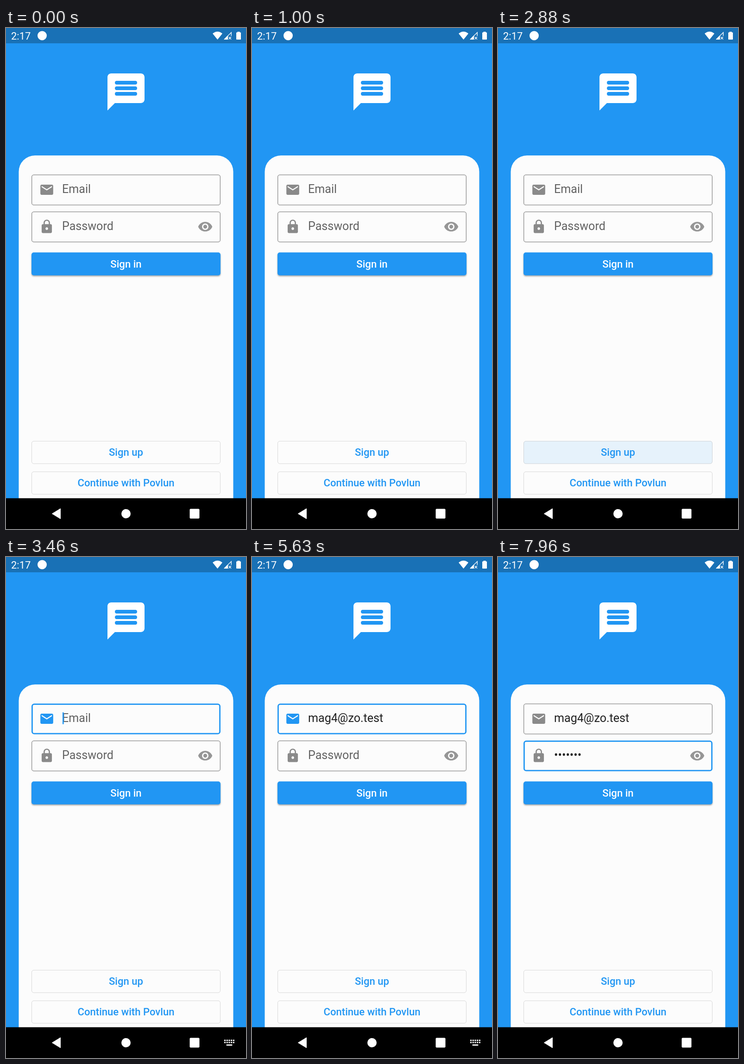
Animation of 518x1081 px, one loop 8000 ms. Source, as an HTML page:

```html
<!DOCTYPE html>
<html lang="en">
<head>
<meta charset="utf-8">
<title>Sign in screen</title>
<style>
html, body { margin: 0; width: 100%; height: 100%; overflow: hidden; background: #000; }
svg { display: block; width: 100%; height: 100%; font: 25.1px Roboto, sans-serif; }
.label { font-size: 22.1px; font-weight: 500; text-anchor: middle; }
.raised { filter: drop-shadow(0 2px 1.5px rgba(0, 0, 0, .35)); }
</style>
</head>
<body>
<svg id="stage" viewBox="0 0 518 1081" preserveAspectRatio="none">
  <rect width="518" height="1081" fill="#2196f3"/>
  <rect width="518" height="33" fill="#1971b6"/>
  <g fill="#fff">
    <text x="11" y="25" font-size="22">2:17</text>
    <circle cx="78" cy="16.5" r="10"/>
    <path d="M446 12Q456.5 3.5 467 12L456.5 25Z"/>
    <path d="M470 25L479 16V25Z"/>
    <path d="M471.5 24.3L486.2 9.6V17M480.5 19L486 24.5M486 19L480.5 24.5" fill="none" stroke="#fff" stroke-width="1.4"/>
    <path d="M499.5 9.5V8H504.5V9.5H506Q507 9.5 507 10.5V24Q507 25 506 25H498Q497 25 497 24V10.5Q497 9.5 498 9.5Z"/>
    <path transform="translate(211 90) scale(4)" d="M20 2H4c-1.1 0-1.99.9-1.99 2L2 22l4-4h14c1.1 0 2-.9 2-2V4c0-1.1-.9-2-2-2z"/>
  </g>
  <path d="M239 118H279M239 130H279M239 142H279" stroke="#2196f3" stroke-width="8" stroke-linecap="round"/>
  <rect x="27.5" y="275" width="463" height="800" rx="35" fill="#fcfcfc"/>
  <g id="form"></g>
  <rect y="1014.6" width="518" height="67"/>
  <g fill="#fff">
    <path d="M117.5 1037V1059L99.5 1048Z" stroke="#fff" stroke-linejoin="round"/>
    <circle cx="259" cy="1048" r="10"/>
    <rect x="396.5" y="1037.5" width="21" height="21" rx="2"/>
  </g>
  <g id="keyboard" stroke="#fff" stroke-width="2.8">
    <path d="M471 1043H493M471 1047.6H493" stroke-dasharray="3.1 1.6"/>
    <path d="M475.7 1053H488.3"/>
  </g>
</svg>
<script>
const LOOP = 8000, BLUE = '#2196f3', GREY = '#8a8a8a';
const EMAIL = 'mag4@zo.test', DOTS = '•'.repeat(7);
const icons = {
  mail: 'M20 4H4c-1.1 0-1.99.9-1.99 2L2 18c0 1.1.9 2 2 2h16c1.1 0 2-.9 2-2V6c0-1.1-.9-2-2-2zm0 4l-8 5-8-5V6l8 5 8-5v2z',
  lock: 'M18 8h-1V6c0-2.76-2.24-5-5-5S7 3.24 7 6v2H6c-1.1 0-2 .9-2 2v10c0 1.1.9 2 2 2h12c1.1 0 2-.9 2-2V10c0-1.1-.9-2-2-2zm-6 9c-1.1 0-2-.9-2-2s.9-2 2-2 2 .9 2 2-.9 2-2 2zm3.1-9H8.9V6c0-1.71 1.39-3.1 3.1-3.1s3.1 1.39 3.1 3.1v2z',
  person: 'M12 12c2.21 0 4-1.79 4-4s-1.79-4-4-4-4 1.79-4 4 1.79 4 4 4zm0 2c-2.67 0-8 1.34-8 4v2h16v-2c0-2.66-5.33-4-8-4z',
  eye: 'M12 4.5C7 4.5 2.73 7.61 1 12c1.73 4.39 6 7.5 11 7.5s9.27-3.11 11-7.5c-1.73-4.39-6-7.5-11-7.5zM12 17c-2.76 0-5-2.24-5-5s2.24-5 5-5 5 2.24 5 5-2.24 5-5 5zm0-8c-1.66 0-3 1.34-3 3s1.34 3 3 3 3-1.34 3-3-1.34-3-3-3z'
};
const form = document.getElementById('form');
const keyboard = document.getElementById('keyboard');

const ramp = (t, start, length) => Math.min(1, Math.max(0, (t - start) / length));
const pulse = (t, a, inLen, b, outLen) => ramp(t, a, inLen) - ramp(t, b, outLen);
const within = (t, a, b) => t >= a && t < b;
const tint = k => `color-mix(in srgb, ${BLUE} ${k * 100}%, ${GREY})`;
const rowTop = row => 316.2 + row * 79.7;

const icon = (name, x, y, color) =>
  `<path transform="translate(${x - 16.6} ${y - 16.6}) scale(1.385)" d="${icons[name]}" fill="${color}"/>`;

const label = (text, y, color, x = 259) =>
  `<text class="label" x="${x}" y="${y}" fill="${color}">${text}</text>`;

function field(row, name, hint, { value = '', focus = 0, tinted = 0 } = {}) {
  const y = rowTop(row), w = 1.3 + 1.5 * focus;
  return `<rect x="${55 + w / 2}" y="${y + w / 2}" width="${408 - w}" height="${66.4 - w}" rx="4.5"
      fill="none" stroke="${tint(focus)}" stroke-width="${w}"/>`
    + icon(name, 88, y + 32.8, tint(tinted))
    + `<text x="121" y="${y + 40.1}" fill="${value ? '#212121' : '#626262'}">${value || hint}</text>`
    + (name === 'lock' ? icon('eye', 430, y + 32.8, '#969696') : '');
}

const filled = (y, text) =>
  `<rect class="raised" x="55" y="${y}" width="408" height="49.6" rx="5" fill="${BLUE}"/>` + label(text, y + 32.3, '#fff');

const outlined = (y, text, press = 0) =>
  `<rect x="55.5" y="${y}" width="407" height="48.5" rx="4.5" fill="${BLUE}" fill-opacity="${press * .1}"
    stroke="#000" stroke-opacity=".14"/>` + label(text, y + 31.5, BLUE);

const cursor = (x, row) =>
  `<rect x="${x}" y="${rowTop(row) + 19}" width="2.6" height="25.5" fill="${BLUE}"/>`;

const handle = opacity =>
  `<g fill="${BLUE}" opacity="${opacity}"><circle cx="121" cy="384" r="15"/>
    <rect x="106" y="369" width="15" height="15" transform="rotate(45 121 384)"/></g>`;

const toolbar = opacity =>
  `<g opacity="${opacity}"><rect x="72" y="267" width="98" height="56" rx="9" fill="#fcfcfc"
    style="filter:drop-shadow(0 1px 1px rgba(0,0,0,.3))"/>${label('Paste', 301.5, '#222', 121)}</g>`;

function signUp() {
  return field(0, 'person', 'Name') + field(1, 'mail', 'Email')
    + field(2, 'lock', 'Password') + field(3, 'lock', 'Confirm Password') + filled(643.7, 'Sign up');
}

function signIn(t) {
  const mailFocus = pulse(t, 3250, 170, 5750, 170);
  const passFocus = ramp(t, 5750, 170);
  const pasted = t >= 5130, typed = t >= 6250;
  let out = field(0, 'mail', 'Email', { value: pasted ? EMAIL : '', focus: mailFocus, tinted: mailFocus })
    + field(1, 'lock', 'Password', { value: typed ? DOTS : '', focus: passFocus })
    + filled(484.2, 'Sign in');
  if (within(t, 3250, 3750) || within(t, 4090, 4630)) out += cursor(122, 0);
  if (within(t, 5130, 5630)) out += cursor(284, 0);
  if (within(t, 5750, 6250)) out += cursor(122, 1);
  if (within(t, 6250, 6750) || within(t, 7250, 7750)) out += cursor(181, 1);
  if (within(t, 4090, 5280)) {
    out += handle(pulse(t, 4090, 150, 5130, 150)) + toolbar(pulse(t, 4300, 150, 5130, 150));
  }
  return out;
}

let last = '';
function draw(now) {
  const t = now % LOOP;
  const registering = within(t, 1630, 2790);
  const press = pulse(t, 1500, 100, 1750, 200) + pulse(t, 2540, 150, 2880, 160);
  const html = (registering ? signUp() : signIn(t))
    + outlined(891.5, registering ? 'Sign in' : 'Sign up', press)
    + outlined(957.5, 'Continue with Povlun');
  if (html !== last) form.innerHTML = last = html;
  keyboard.style.display = within(t, 3290, 5870) ? '' : 'none';
  requestAnimationFrame(draw);
}
draw(0);
</script>
</body>
</html>
```
